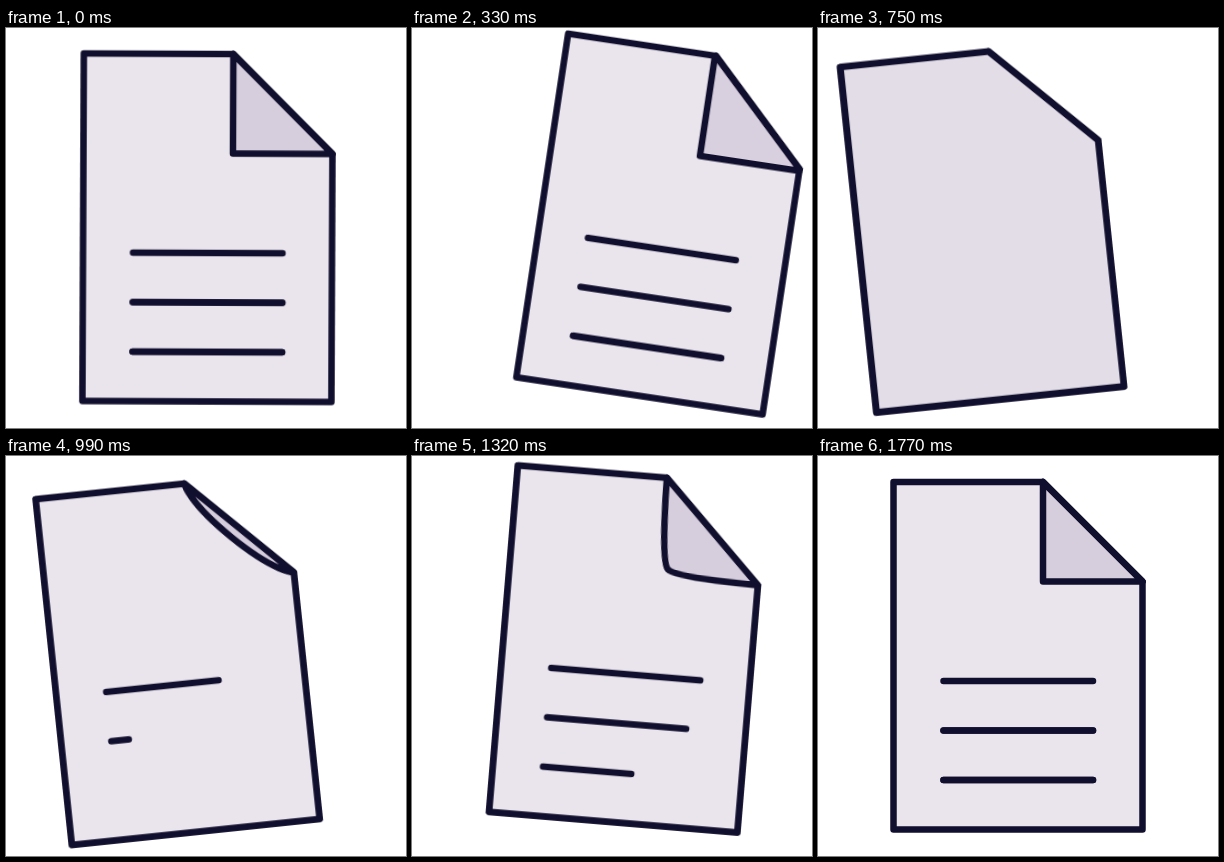
Recreate the animation shown at these times as an HTML page. Size 400 by 400 pixels, loop 1800 ms.

```html
<!DOCTYPE html>
<html lang="en">
<head>
<meta charset="utf-8">
<title>Turning page</title>
<style>
  :root {
    --paper: #eae5ec;
    --back: #d6cedd;
    --ink: #110f2e;
  }
  html, body { margin: 0; width: 100%; height: 100%; overflow: hidden; background: #fff; }
  svg { display: block; width: 100%; height: 100%; }

  #sheet {
    fill: var(--paper);
    stroke: var(--ink);
    stroke-width: 6.5;
    stroke-linecap: round;
    stroke-linejoin: round;
  }
  #slide, #lift, #tilt { animation: 1800ms cubic-bezier(.37, 0, .63, 1) -30ms infinite; }
  #turn, #fold, .write { animation: 1800ms linear -30ms infinite; }

  /* Sway: sideways, vertical and tilt run on slightly different beats */
  #slide { animation-name: slide; }
  #lift { animation-name: lift; }
  #tilt { animation-name: tilt; transform-origin: 200px 200px; }
  @keyframes slide {
    0% { transform: translateX(0); }
    15.5% { transform: translateX(55px); animation-timing-function: cubic-bezier(.65, 0, .35, 1); }
    48.7% { transform: translateX(-38.3px); }
    77% { transform: translateX(16.2px); }
    100% { transform: translateX(0); }
  }
  @keyframes lift {
    0% { transform: translateY(0); }
    29.4% { transform: translateY(-4.8px); }
    57.8% { transform: translateY(3.4px); }
    75.6% { transform: translateY(-6.8px); }
    100% { transform: translateY(0); }
  }
  @keyframes tilt {
    0% { transform: rotate(0deg); }
    16.1% { transform: rotate(8.8deg); animation-timing-function: cubic-bezier(.6, 0, .45, 1); }
    50% { transform: rotate(-6.85deg); animation-timing-function: cubic-bezier(.55, 0, .64, 1); }
    78.3% { transform: rotate(5.2deg); }
    100% { transform: rotate(0deg); }
  }

  /* The folded corner sweeps over the page and becomes the new page */
  #turn { animation-name: turn, fade; }
  @keyframes turn {
    0%, 17.5% {
      d: path("M225 26 L225 26 L324.5 125.5 L324.5 125.5 L225 125.5 Z");
      animation-timing-function: cubic-bezier(.7, 0, .3, 1);
    }
    45%, 100% { d: path("M75.5 26 L225 26 L324.5 125.5 L324.5 373.5 L75.5 373.5 Z"); }
  }
  @keyframes fade {
    0%, 16.67% { fill: var(--back); }
    57%, 100% { fill: var(--paper); }
  }

  /* A new corner bends out of the diagonal edge */
  #fold { fill: var(--back); animation-name: fold; }
  @keyframes fold {
    0%, 46.7% {
      d: path("M225 26 C225 26 226.75 27.75 274.75 75.75 C322.75 123.75 324.5 125.5 324.5 125.5 Z");
      animation-timing-function: cubic-bezier(.33, 0, .6, 1);
    }
    86.7%, 100% {
      d: path("M225 26 C225 26 225 125.5 225 125.5 C225 125.5 324.5 125.5 324.5 125.5 Z");
    }
  }

  /* New text lines, one after another */
  .write { stroke-dasharray: 150 300; animation-name: write; }
  .write:nth-child(1) { animation-delay: -1830ms; }
  .write:nth-child(2) { animation-delay: -1630ms; }
  .write:nth-child(3) { animation-delay: -1430ms; }
  @keyframes write {
    0%, 44.2% { stroke-dashoffset: 151; animation-timing-function: cubic-bezier(.33, 1, .68, 1); }
    77.5%, 100% { stroke-dashoffset: 0; }
  }
</style>
</head>
<body>
<svg viewBox="0 0 400 400">
  <g id="slide"><g id="lift"><g id="tilt"><g id="sheet">
    <path d="M75.5 26 H225 L324.5 125.5 V373.5 H75.5 Z"/>
    <path d="M125.5 225 H275 M125.5 274.5 H275 M125.5 324 H275"/>
    <path id="turn" d="M225 26 L225 26 L324.5 125.5 L324.5 125.5 L225 125.5 Z"/>
    <g>
      <path class="write" d="M125.5 225 H275"/>
      <path class="write" d="M125.5 274.5 H275"/>
      <path class="write" d="M125.5 324 H275"/>
    </g>
    <path id="fold" d="M225 26 C225 26 226.75 27.75 274.75 75.75 C322.75 123.75 324.5 125.5 324.5 125.5 Z"/>
  </g></g></g></g>
</svg>
</body>
</html>
```
